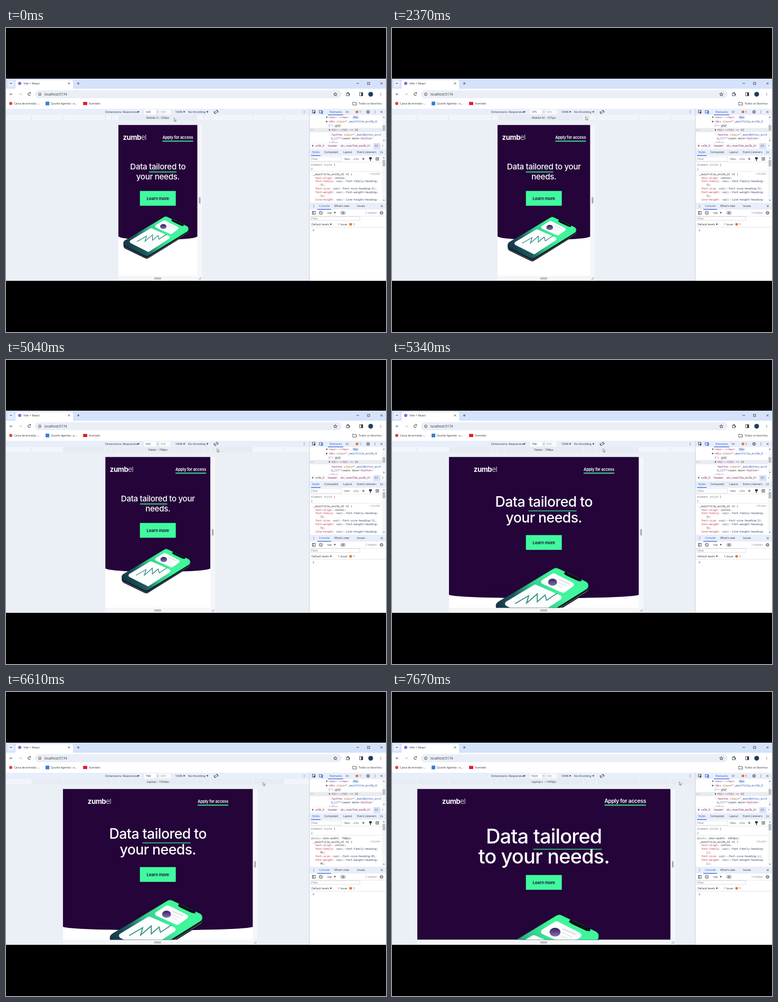
An HTML page with a canvas for the animation above (8000 ms loop, 720 by 576 pixels).

```html
<!DOCTYPE html>
<html lang="en">
<head>
<meta charset="utf-8">
<title>Responsive preview</title>
<style>
  html, body { margin: 0; width: 100%; height: 100%; overflow: hidden; background: #000; }
  canvas { display: block; width: 720px; height: 576px; }
</style>
</head>
<body>
<canvas id="stage" width="720" height="576"></canvas>
<script>
const ctx = document.getElementById('stage').getContext('2d');
const LOOP = 8000, SCALE = 360 / 768, MID = 287.75;
const UI = '"Open Sans", sans-serif', PAGE = 'Inter, sans-serif', MONO = '"Noto Sans Mono", monospace';
const INK = '#303236', BLUE = '#2459d3', GREEN = '#40fa9f', PURPLE = '#240439';

const devices = [
  [320, 'Mobile S'], [375, 'Mobile M'], [425, 'Mobile L'],
  [768, 'Tablet'], [1024, 'Laptop'], [1440, 'Laptop L']
];

const phoneLayout = { size: 15.2, base: 268, lead: 19, pad: 8.7, link: 7.6, button: 309, edge: 395, phone: 1, top: 361 };
const layouts = [
  { at: 0, width: 320, ...phoneLayout, words: ['to', 'your needs.'], phone: 0.95, top: 360 },
  { at: 2370, width: 375, ...phoneLayout, words: ['to your', 'needs.'] },
  { at: 3940, width: 425, ...phoneLayout, words: ['to your', 'needs.'] },
  { at: 5340, width: 768, size: 26.7, base: 278, lead: 30, pad: 47, link: 7.6, button: 332, edge: 445,
    phone: 1.35, top: 398, words: ['to', 'your needs.'] },
  { at: 7070, width: 1024, size: 38, base: 287, lead: 37.5, pad: 47, link: 10.3, button: 347, edge: 520,
    phone: 1.65, top: 427, words: ['', 'to your needs.'] }
];

// time, x, y of the pointer tip
const pointer = [
  [0, 318.5, 170.5], [930, 318.5, 170.5], [931, 319, 170], [1430, 319, 170], [1700, 364.5, 168],
  [1970, 364.5, 168], [2000, 367, 168], [2900, 367, 168], [3070, 380.5, 168], [3500, 380.5, 168],
  [3540, 382, 168], [4340, 382, 168], [4640, 399, 168], [5039, 399, 168], [5040, 400, 168],
  [6040, 400, 168], [6170, 484.5, 169], [6609, 484.5, 169], [6610, 487, 171], [7570, 487, 171],
  [7670, 544.5, 170], [LOOP, 544.5, 170]
];

function pointerAt(t) {
  const i = pointer.findIndex(k => k[0] > t);
  const a = pointer[i - 1], b = pointer[i];
  const f = (t - a[0]) / (b[0] - a[0]);
  return [a[1] + (b[1] - a[1]) * f, a[2] + (b[2] - a[2]) * f];
}

function box(x0, y0, x1, y1, fill, radius = 0) {
  ctx.fillStyle = fill;
  ctx.beginPath();
  ctx.roundRect(x0, y0, x1 - x0, y1 - y0, radius);
  ctx.fill();
}

function line(points, color, width = 0.8) {
  ctx.strokeStyle = color;
  ctx.lineWidth = width;
  ctx.beginPath();
  points.forEach(([x, y]) => ctx.lineTo(x, y));
  ctx.stroke();
}

function shape(points, fill) {
  ctx.fillStyle = fill;
  ctx.beginPath();
  points.forEach(([x, y]) => ctx.lineTo(x, y));
  ctx.closePath();
  ctx.fill();
}

function dot(x, y, r, fill, ry = r) {
  ctx.fillStyle = fill;
  ctx.beginPath();
  ctx.ellipse(x, y, r, ry, 0, 0, 7);
  ctx.fill();
}

function ring(x, y, r, color = INK, width = 0.9, from = 0, to = 7) {
  ctx.strokeStyle = color;
  ctx.lineWidth = width;
  ctx.beginPath();
  ctx.arc(x, y, r, from, to);
  ctx.stroke();
}

function frame(x, y, w, h, color = INK) {
  ctx.strokeStyle = color;
  ctx.lineWidth = 0.8;
  ctx.strokeRect(x, y, w, h);
}

function setFont(size, family, weight = 400, spacing = 0) {
  ctx.font = `${weight} ${size}px ${family}`;
  ctx.letterSpacing = spacing * size + 'px';
}

// y is the optical middle of the line
function label(str, x, y, size = 5.5, color = INK, align = 'left') {
  setFont(size, UI);
  ctx.textAlign = align;
  ctx.fillStyle = color;
  ctx.fillText(str, x, y + size * 0.36);
  ctx.textAlign = 'left';
}

function code(x, y, ...runs) {
  setFont(5.1, MONO);
  for (const [str, color] of runs) {
    ctx.fillStyle = color;
    ctx.fillText(str, x, y + 1.8);
    x += ctx.measureText(str).width;
  }
}

function caret(x, y, r = 1.8, color = INK) {
  shape([[x - r, y - r * 0.7], [x + r, y - r * 0.7], [x, y + r]], color);
}
function sideCaret(x, y, dir = 1, color = INK) {
  shape([[x - dir, y - 1.8], [x + dir * 1.5, y], [x - dir, y + 1.8]], color);
}
function cross(x, y, r = 1.8) {
  line([[x - r, y - r], [x + r, y + r]], INK);
  line([[x - r, y + r], [x + r, y - r]], INK);
}
function plus(x, y, r = 2.3) {
  line([[x - r, y], [x + r, y]], INK);
  line([[x, y - r], [x, y + r]], INK);
}
function dots(x, y) {
  [-2, 0, 2].forEach(d => dot(x, y + d, 0.6, INK));
}
function gear(x, y) {
  ring(x, y, 2.4);
  dot(x, y, 0.8, INK);
  for (let a = 0; a < 6; a++) dot(x + 2.9 * Math.cos(a * 1.047), y + 2.9 * Math.sin(a * 1.047), 0.6, INK);
}
function chevrons(x, y) {
  [-2, 1].forEach(d => line([[x + d, y - 1.8], [x + d + 1.8, y], [x + d, y + 1.8]], INK));
}
function issueBadge(x, y) {
  box(x - 2.3, y - 2.3, x + 2.3, y + 2.3, '#ed6b21', 0.8);
  label('1', x + 4.6, y);
}

function drawBrowser() {
  box(0, 96, 720, 115, '#d5e2fb');
  box(3, 99, 15, 112, '#e6eefc', 3);
  line([[7.5, 104], [9.3, 106], [11.1, 104]], INK, 1);
  box(18, 98.5, 127, 116, '#fff', [4, 4, 0, 0]);
  dot(26, 105, 3, '#8a63ee');
  label('Vite + React', 33, 105, 5.7);
  cross(119.5, 105, 1.7);
  plus(137, 105);
  line([[664, 105], [669, 105]], INK);
  frame(685, 103, 4, 4);
  cross(711.5, 105, 2);

  box(0, 115, 720, 153, '#fff');
  [[10, -1, '#555'], [27, 1, '#bbb']].forEach(([x, d, c]) => {
    line([[x - 2.5, 125.5], [x + 2.5, 125.5]], c);
    line([[x + d * 0.3, 123.2], [x + d * 2.6, 125.5], [x + d * 0.3, 127.8]], c);
  });
  ring(44, 125.5, 2.4, INK, 1, 0.3, 5.4);
  shape([[44.5, 122], [47, 122], [47, 124.8]], INK);
  box(55, 118, 636, 133, '#e9eef7', 7.5);
  dot(64, 125.5, 4.5, '#fff');
  ring(64, 125.5, 2.7);
  line([[64, 124.5], [64, 127.2]], INK);
  label('localhost:5174', 73, 125.5, 6.3);
  const star = [...Array(10)].map((_, i) => {
    const r = i % 2 ? 1.5 : 3.5, a = i * Math.PI / 5 - Math.PI / 2;
    return [624 + r * Math.cos(a), 125.8 + r * Math.sin(a)];
  });
  line([...star, star[0]], INK, 0.8);
  frame(645, 123.5, 5, 5);
  dot(648, 123, 1.2, INK);
  dot(650.5, 126, 1.2, INK);
  frame(670, 122.5, 6, 6);
  box(673, 122.5, 676, 128.5, INK);
  dot(691, 125.5, 4.5, '#1d3e5d');
  dots(710, 125.5);

  dot(9, 143, 3, '#df4639');
  label('Caixa de entrada -...', 15, 143, 5.3);
  box(75, 139.5, 82, 146.5, '#397ed8');
  label('Quorbi Agenda - o...', 85, 143, 5.3);
  box(146, 140, 154, 146, '#e3202b', 1);
  label('Vumtelo', 157, 143, 5.5);
  line([[657, 146], [657, 140.5], [659.5, 140.5], [660.5, 141.5], [664, 141.5], [664, 146], [657, 146]], INK);
  label('Todos os favoritos', 668, 143, 5.2);
}

function drawDeviceBar(layout, hovered) {
  box(0, 153, 575, 479, '#ebeff6');
  box(0, 153, 575, 165, '#e8eefa');
  label('Dimensions: Responsive', 188, 159);
  caret(251, 159);
  box(262, 154.5, 284, 163.5, '#fff');
  label(layout.width, 269.5, 159, 5.5, INK, 'center');
  label('×', 287.5, 159, 5.5, '#777', 'center');
  box(291, 154.5, 312, 163.5, '#f8fafc');
  label('600', 298, 159, 5.5, '#999', 'center');
  label('100%', 320.5, 159);
  caret(337.5, 159);
  label('No throttling', 345, 159);
  caret(381.5, 159);
  ctx.save();
  ctx.translate(398, 159);
  ctx.rotate(-0.75);
  frame(-3, -1.5, 6, 3);
  ctx.restore();
  ring(398, 159, 3.8, INK, 0.8, -1.2, 0.4);
  ring(398, 159, 3.8, INK, 0.8, 1.9, 3.5);
  dots(565, 159);

  const half = hovered[0] * SCALE / 2;
  box(0, 165, 575, 175, '#f2f5fa');
  box(Math.max(0, MID - half), 165, Math.min(575, MID + half), 175, '#e7ecf3');
  for (const [w] of devices) {
    [-1, 1].forEach(side => {
      const x = MID + side * w * SCALE / 2;
      if (x < 575) line([[x, 165], [x, 175]], w > hovered[0] ? '#dfe5ee' : '#f6f8fb', 1);
    });
  }
  label(`${hovered[1]} – ${hovered[0]}px`, 287.5, 170, 5.5, INK, 'center');
}

function drawPhone(scale, top) {
  const face = [[20, -4], [73, 21], [-17, 77], [-71, 51]];
  const rounded = (pts, r) => {
    ctx.beginPath();
    pts.forEach((p, i) => {
      const q = pts[(i + 1) % 4], s = pts[(i + 3) % 4];
      if (!i) ctx.moveTo((s[0] + p[0]) / 2, (s[1] + p[1]) / 2);
      ctx.arcTo(...p, ...q, r);
    });
    ctx.closePath();
  };
  const lower = d => face.map(([x, y]) => [x, y + d]);
  ctx.save();
  ctx.translate(283.3, top);
  ctx.scale(scale, scale);
  [[5, '#0a121b'], [3.5, '#718087'], [2.6, '#0b1520']].forEach(([d, c]) => {
    ctx.fillStyle = c;
    rounded(lower(d), 6.5);
    ctx.fill();
  });
  const glow = ctx.createLinearGradient(-58, 58, 40, 0);
  glow.addColorStop(0, '#16344a');
  glow.addColorStop(0.25, '#1d5b5e');
  glow.addColorStop(0.5, '#32c98a');
  glow.addColorStop(0.75, '#40f59c');
  ctx.fillStyle = glow;
  rounded(face, 6.5);
  ctx.fill();
  ctx.strokeStyle = '#16312f';
  ctx.lineWidth = 0.7;
  ctx.stroke();
  line([[32.5, 3.5], [36, 6], [52, 13.5], [56, 14]], '#0a1018', 4);
  ctx.fillStyle = '#fdfefe';
  rounded([[-9, 20], [32, 38], [-14, 68], [-55, 47.5]], 3.5);
  ctx.fill();
  rounded([[17, 4], [48.5, 20], [31, 32.5], [-4, 17]], 3);
  ctx.fill();
  const avatar = ctx.createLinearGradient(0, 12, 0, 23);
  avatar.addColorStop(0, '#35205e');
  avatar.addColorStop(1, '#8d7ab5');
  dot(15.5, 17, 6.3, avatar, 5);
  line([[24, 13], [39, 19.5]], '#dcdfe3', 1.6);
  line([[23, 17], [35, 22.5]], '#e6e8eb', 1.3);
  line([[22, 21], [30, 25]], '#e6e8eb', 1.3);
  line([[-37, 47], [-18, 36], [-21, 46.5], [-6, 33.5], [-6, 44.5], [5, 35], [7, 42.5], [22, 32.5]], '#2c8a80', 1.3);
  ctx.restore();
}

function drawHeading({ size, base, lead, words }) {
  setFont(size, PAGE, 500, -0.022);
  const measure = s => ctx.measureText(s).width;
  const first = words[0] ? 'Data tailored ' + words[0] : 'Data tailored';
  const x = MID - measure(first) / 2, under = x + measure('Data ');
  ctx.fillStyle = '#fff';
  ctx.fillText(first, x, base);
  ctx.fillText(words[1], MID - measure(words[1]) / 2, base + lead);
  box(under, base + size * 0.27, under + measure('tailored'), base + size * 0.27 + 1.3, GREEN);
}

function drawPage(layout) {
  const half = layout.width * SCALE / 2, left = MID - half, right = MID + half;
  box(left, 184, right + 9, 479, '#f4f6f9');
  ctx.save();
  ctx.beginPath();
  ctx.rect(left, 183.7, half * 2, 285.6);
  ctx.clip();
  box(left, 183, right, 470, '#fff');
  box(left, 183, right, layout.edge, PURPLE);
  dot(MID, layout.edge - 0.5, half, PURPLE, 7);

  const logo = left + layout.pad;
  setFont(13.2, PAGE, 700, -0.03);
  ctx.fillStyle = '#fff';
  ctx.fillText('zumb', logo, 212);
  const bold = ctx.measureText('zumb').width;
  setFont(13.2, PAGE, 300, -0.03);
  ctx.fillText('el', logo + bold, 212);

  setFont(layout.link, PAGE, 600, -0.03);
  const linkWidth = ctx.measureText('Apply for access').width, end = right - layout.pad + 0.5;
  ctx.fillText('Apply for access', end - linkWidth, 207 + layout.link * 0.33);
  box(end - linkWidth, 213.5, end, 215.2, GREEN);

  drawHeading(layout);
  box(253.7, layout.button - 0.3, 321.7, layout.button + 27.7, GREEN);
  setFont(8, PAGE, 600, -0.02);
  ctx.textAlign = 'center';
  ctx.fillStyle = PURPLE;
  ctx.fillText('Learn more', MID, layout.button + 16.9);
  ctx.textAlign = 'left';
  drawPhone(layout.phone, layout.top);
  ctx.restore();

  box(right + 2.5, 320, right + 6, 333, '#c5c9cf', 0.8);
  [3.5, 5].forEach(d => line([[right + d, 321.5], [right + d, 331.5]], '#777', 0.5));
  [473.4, 475.6].forEach(y => line([[281, y], [294, y]], '#777', 0.9));
  line([[right + 2, 477], [right + 7, 472]], '#666');
  line([[right + 5, 477], [right + 7, 475]], '#666');
}

function drawElements() {
  const tag = '#8a2056', attr = '#994f20', value = '#2550ad';
  box(575, 153, 720, 479, '#fff');
  box(575, 153, 720, 165, '#e8eefa');
  frame(580.5, 156, 5, 5);
  shape([[583, 158], [587, 160], [585, 160.7], [584, 163]], INK);
  frame(593.5, 156.5, 6, 4.5, BLUE);
  frame(597.5, 158, 2.5, 4, BLUE);
  label('Elements', 613, 159, 5.5, BLUE);
  box(610, 164, 639, 165.2, BLUE);
  chevrons(646, 159);
  issueBadge(665, 159);
  gear(686, 159);
  dots(699, 159);
  cross(711.5, 159);

  ctx.save();
  ctx.beginPath();
  ctx.rect(575, 165.5, 138, 52);
  ctx.clip();
  box(575, 189.5, 713, 197.5, '#e8ebf0');
  sideCaret(608, 169);
  code(611, 169, ['<nav>', tag], ['⋯', INK], ['</nav>', tag]);
  box(656, 166, 669, 173, '#dce7fb', 3);
  label('flex', 662.5, 169.3, 5, value, 'center');
  caret(607.5, 177.5);
  code(611, 177.5, ['<div ', tag], ['class', attr], ['="', tag], ['_mainTitle_evs5b_6', value]);
  code(611, 185, ['1', value], ['">', tag]);
  box(621, 182, 636, 189, '#f0f1f3', 3);
  label('grid', 628.5, 185.3, 5, INK, 'center');
  label('⋯', 576.5, 193, 6);
  sideCaret(613, 193);
  code(616, 193, ['<h1>', tag], ['⋯', INK], ['</h1>', tag], [' == $0', '#666']);
  code(616, 201.7, ['<button ', tag], ['class', attr], ['="', tag], ['_mainButton_evs5', value]);
  code(616, 209.5, ['b_117', value], ['">', tag], ['Learn more', INK], ['</button>', tag]);
  code(611, 217, ['</div>', tag]);
  ctx.restore();

  box(713, 165, 720, 218, '#f5f6f8');
  caret(716, 169, -1.6, '#777');
  box(713.5, 184, 718.5, 195, '#bcc0c4');
  caret(716, 213, 1.6, '#777');
  box(575, 218, 720, 229.5, '#f9fafc');
  sideCaret(581, 223, -1);
  label('vs5b_0', 586, 223, 5.3, tag);
  label('header', 610, 223, 5.3, tag);
  label('div._mainTitle_evs5b_61', 634, 223, 5.1, tag);
  box(696, 218, 709, 229, '#d5e2fa');
  label('h1', 699, 223, 5.3, tag);
  sideCaret(714, 223, 1, '#aaa');
}

function drawStyles(variant) {
  box(575, 229.5, 720, 242, '#e8eefa');
  label('Styles', 580, 235.5, 5.3, BLUE);
  box(578, 241, 596, 242.2, BLUE);
  label('Computed', 603, 235.5, 5.3);
  label('Layout', 639, 235.5, 5.3);
  label('Event Listeners', 665, 235.5, 5.2);
  chevrons(711, 235.5);
  frame(577.5, 244, 58, 8.5, '#d5dae2');
  label('Filter', 579, 248.5, 5.2, '#777');
  code(639, 248, [':hov', INK]);
  code(656, 248, ['.cls', INK]);
  plus(677, 248, 2.5);
  box(688, 245, 693, 248.5, INK);
  line([[690.5, 248], [690.5, 252]], INK, 1.4);
  frame(701, 245.5, 5, 5);
  shape([[704.5, 246.5], [702, 248], [704.5, 249.5]], INK);
  line([[575, 254], [720, 254]], '#dce1e9');

  const prop = '#c73a44', key = variant ? variant.key : '5';
  const css = (name, rest) => [[name, prop], [': ' + rest, '#30406a']];
  const rules = [
    [580, [['._mainTitle_evs5b_61 h1 {', INK]]],
    [586, css('text-align', 'center;')],
    [586, css('font-family', 'var(--font-family-heading-')],
    [596, [[key + ');', INK]]],
    [586, css('font-size', `var(--font-size-heading-${key});`)],
    [586, css('font-weight', 'var(--font-weight-heading-')],
    [596, [[key + ');', INK]]],
    [586, css('line-height', 'var(--line-height-heading-')]
  ];
  if (variant) rules.unshift([578, [['@media', '#888'], [` (min-width: ${variant.min}px)`, INK]]]);
  ctx.save();
  ctx.beginPath();
  ctx.rect(575, 254, 137, 76);
  ctx.clip();
  code(578, 259.3, ['element.style', '#777'], [' {', INK]);
  code(578, 267, ['}', INK]);
  line([[575, 271.5], [713, 271.5]], '#dfe3e9', 0.7);
  rules.forEach(([x, runs], i) => code(x, 276.8 + i * 6.9, ...runs));
  code(689, variant ? 283.5 : 276.5, ['<style>', '#888']);
  ctx.restore();
  box(712.5, 243, 720, 330, '#f5f6f8');
  caret(716, 246, -1.6, '#777');
  box(713.5, 250, 718.5, 262, '#bcc0c4');
  caret(716, 326.5, 1.6, '#777');
}

function drawConsole() {
  box(575, 331, 720, 344, '#e8eefa');
  dots(583, 337.5);
  label('Console', 593, 337.5, 5.4, BLUE);
  box(590, 343, 616, 344.2, BLUE);
  label("What's new", 622, 337.5, 5.3);
  label('Issues', 665, 337.5, 5.3);
  cross(712, 337.5);
  frame(580.5, 347.5, 5.5, 5.5);
  line([[582.5, 347.5], [582.5, 353]], INK);
  ring(596.5, 350.3, 3);
  line([[594.5, 348.3], [598.5, 352.3]], INK);
  label('top', 609, 350.3, 5.3);
  caret(623, 350);
  ctx.strokeStyle = INK;
  ctx.beginPath();
  ctx.ellipse(638.5, 350.3, 4, 2.6, 0, 0, 7);
  ctx.stroke();
  dot(638.5, 350.3, 1.2, INK);
  label('2 hidden', 681, 350.3, 5.3, '#888');
  gear(711.5, 350.3);
  line([[575, 356.5], [720, 356.5]], '#dce1e9');
  frame(577.5, 357.5, 93, 7, '#d5dae2');
  label('Filter', 579, 361, 5.2, '#777');
  label('Default levels', 579, 372, 5.3);
  caret(615.5, 372);
  label('1 Issue:', 629, 372, 5.2);
  issueBadge(653, 372);
  line([[575, 377.5], [720, 377.5]], '#dce1e9');
  line([[581.5, 381.5], [583.5, 383.3], [581.5, 385.1]], BLUE, 1);
  line([[575, 153], [575, 479]], '#c9d2e0', 1);
}

function drawPointer([x, y]) {
  const arrow = [[0, 0], [0, 6.2], [1.4, 5], [2.4, 7], [3.3, 6.6], [2.4, 4.6], [4.3, 4.4], [0, 0]]
    .map(([dx, dy]) => [x + dx, y + dy]);
  shape(arrow, '#fff');
  line(arrow, '#444', 0.6);
}

function draw(t) {
  const layout = layouts.findLast(l => l.at <= t);
  const tip = pointerAt(t);
  const hovered = devices.find(([w]) => Math.abs(tip[0] - MID) <= w * SCALE / 2);
  const variant = t >= 7210 ? { min: 1024, key: 'L' } : t >= 5540 ? { min: 768, key: 'M' } : null;
  box(0, 0, 720, 576, '#000');
  drawBrowser();
  drawDeviceBar(layout, hovered);
  drawPage(layout);
  drawElements();
  drawStyles(variant);
  drawConsole();
  drawPointer(tip);
}

function tick(now) {
  draw(now % LOOP);
  requestAnimationFrame(tick);
}
draw(0);
requestAnimationFrame(tick);
</script>
</body>
</html>
```
